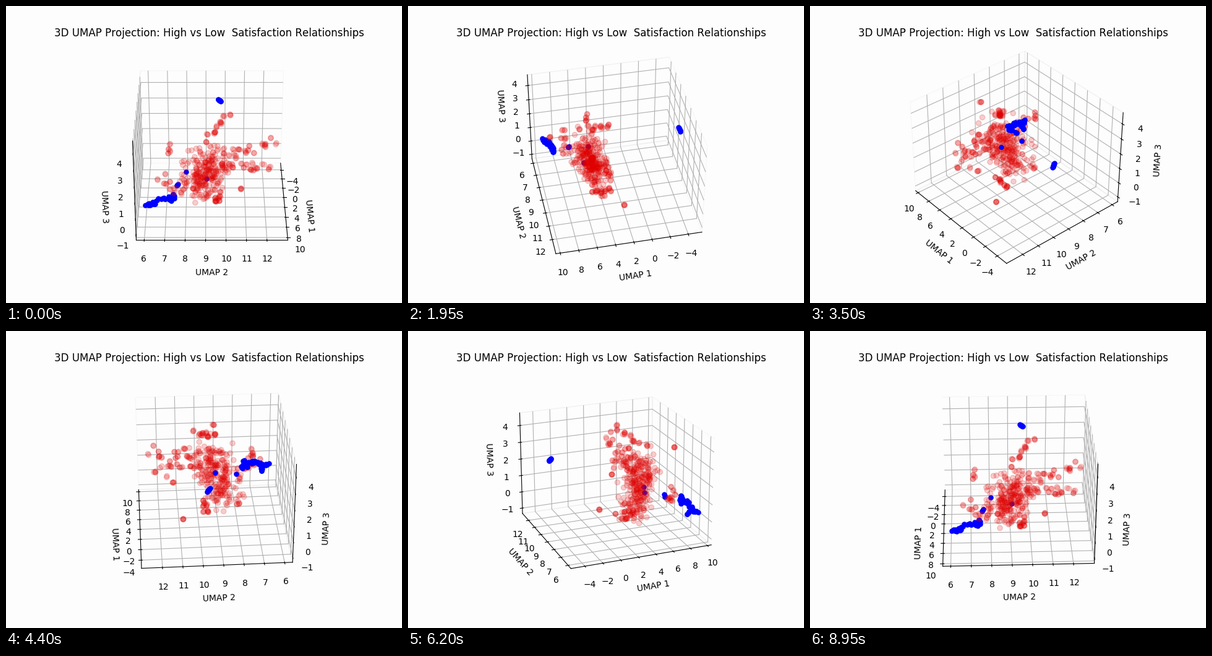
Write a matplotlib script that moves like this. It is 640x480 px and loops after 9000 ms.

```python
import numpy as np
import matplotlib.pyplot as plt
from matplotlib.animation import FuncAnimation

plt.rcParams["text.kerning_factor"] = 6  # whole-pixel kerning

FRAMES, INTERVAL = 180, 50
BG = "#fdfdfd"
LOW = np.array([-5.52, 5.61, -1.335])
HIGH = np.array([10.47, 13.02, 4.742])
BOX = np.array([1.19048, 1.19048, 0.89286])  # drawn size of the axes cube

rng = np.random.default_rng(12)


def to_data(p):
    """Cube coordinates, measured from its centre, to axis values."""
    return LOW + (p / BOX + 0.5) * (HIGH - LOW)


def scattered(pts, spread):
    return pts + np.clip(rng.normal(size=pts.shape), -2.1, 2.1) * spread


def strand(n, start, end, spread, copies=1):
    """Points strewn around a segment, each with a few close copies."""
    pts = scattered(np.linspace(start, end, n), spread)
    return scattered(np.repeat(pts, copies, axis=0), 0.004 * (copies > 1))


def clump(n, centre):
    return strand(n, centre, centre, 0.005)


# Low satisfaction: a slanted core with arms reaching out of it.
low = to_data(np.vstack([
    strand(250, (.12, -.11, -.28), (.26, 0, .12), (.06, .085, .06)),
    strand(9, (.25, -.055, .26), (.065, .126, .379), .014, 3),
    strand(16, (.2, .08, .08), (.133, .515, .18), .025, 2),
    strand(14, (.19, .1, .03), (.2, .465, -.05), .025, 2),
    strand(4, (.16, -.33, .161), (.158, -.345, .09), .006, 2),
    strand(9, (.324, -.41, -.002), (.38, -.25, -.16), .018, 2),
    strand(7, (.06, .05, -.37), (.19, .07, -.34), .014, 3),
    clump(4, (.51, -.05, .216)),
    clump(4, (-.04, .24, -.361)),
    clump(4, (.018, -.215, -.269)),
    clump(4, (.108, .315, -.095)),
    clump(4, (.218, .212, .156)),
]))

# High satisfaction: a far streak, a band at one edge and a few strays.
high = to_data(np.vstack([
    strand(10, (-.528, .0745, .194), (-.518, .0505, .218), 0),
    strand(22, (.495, -.525, -.183), (.455, -.295, -.118), .008),
    strand(8, (.44, -.455, -.217), (.48, -.45, -.17), .006),
    strand(4, (.45, -.33, -.163), (.455, -.3, -.158), .005),
    strand(3, (.326, -.268, -.095), (.328, -.28, -.11), 0),
    clump(1, (.171, -.21, -.083)),
    clump(1, (.24, -.04, -.098)),
]))

fig = plt.figure(figsize=(6.4, 4.8), dpi=100, facecolor=BG)
ax = fig.add_subplot(111, projection="3d", facecolor=BG)
ax.scatter(*high.T, color="blue", s=26, depthshade=False)
ax.scatter(*low.T, color="#e00000", s=36, alpha=0.19)

ax.set_xticks(range(-4, 11, 2))
ax.set_yticks(range(6, 13))
ax.set_zticks(range(-1, 5))
ax.set_xlim(LOW[0], HIGH[0])
ax.set_ylim(LOW[1], HIGH[1])
ax.set_zlim(LOW[2], HIGH[2])
ax.set_xlabel("UMAP 1")
ax.set_ylabel("UMAP 2")
ax.set_zlabel("UMAP 3")
ax.set_title("3D UMAP Projection: High vs Low  Satisfaction Relationships")
for axis in (ax.xaxis, ax.yaxis, ax.zaxis):
    axis.pane.fill = False


def update(i):
    azim = 360 * i / FRAMES
    ax.view_init(elev=30 + 10 * np.sin(np.radians(azim)), azim=azim)
    return []


anim = FuncAnimation(fig, update, frames=FRAMES, interval=INTERVAL,
                     init_func=lambda: update(0), repeat=True, repeat_delay=0)
plt.show()
```
